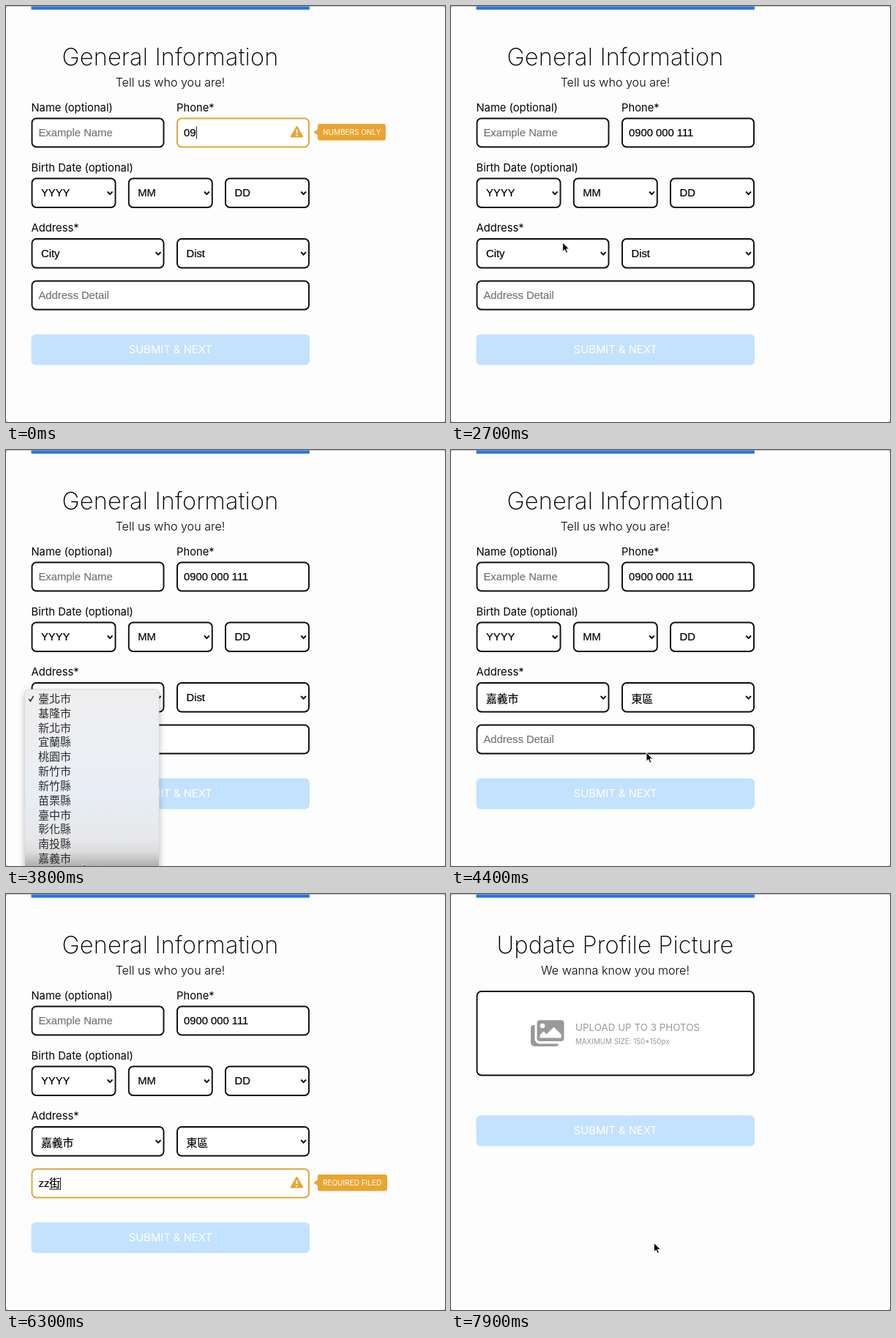
An HTML page for the animation above (8000 ms loop, 600x568 px).

```html
<!DOCTYPE html>
<html lang="en">
<head>
<meta charset="utf-8">
<title>Form walkthrough</title>
<style>
html, body { margin: 0; width: 100%; height: 100%; overflow: hidden; background: #fdfdfd; }
svg { display: block; width: 600px; height: 568px; }
text { white-space: pre; }
.ui { font-family: Inter, sans-serif; }
.field { font-family: "Liberation Sans", "Noto Sans CJK TC", "Noto Sans CJK", sans-serif; font-size: 14.8px; stroke: #000; stroke-width: .2px; }
.menu { font-family: "Noto Sans CJK TC", "Noto Sans CJK", sans-serif; font-size: 15px; }
.mid { text-anchor: middle; }
.title { font-size: 32.5px; font-weight: 200; letter-spacing: .15px; }
.sub { font-size: 16.1px; font-weight: 300; }
.label { font-size: 14.75px; font-weight: 430; }
.btn { font-size: 14.8px; }
.tip { font-size: 10px; fill: #fff; }
.hint { fill: #757575; stroke: #757575; }
</style>
</head>
<body>
<svg id="stage" viewBox="0 0 600 568"></svg>
<script>
const GOLD = '#eaa430', EDGE = '#dba637', INK = '#0c0c0c', PALE = [195, 226, 255], BLUE = [47, 118, 217];
const CITIES = '臺北市 基隆市 新北市 宜蘭縣 桃園市 新竹市 新竹縣 苗栗縣 臺中市 彰化縣 南投縣 嘉義市'.split(' ');
const ROW = 19.83, MENU_TOP = 330;
const DIGITS = '0900000111';
// Address text while typing: [time, committed, composing]
const ADDRESS = [[5200, 'z', ''], [5400, 'zz', ''], [5600, 'zz', 'ㄐ'], [5800, 'zz', 'ㄐㄧ'],
  [5900, 'zz', 'ㄐㄧㄝ'], [6100, 'zz', '街'], [6500, 'zz街', '']];
// Pointer: [time, x, y, shape], eased from one entry to the next
const POINTER = [[0, 300, 180, ''], [1900, 300, 180, 'beam'], [2000, 288, 194, 'arrow'], [2400, 152.7, 323, 'arrow'],
  [3000, 152.7, 323, 'arrow'], [3650, 106, 565, 'arrow'], [3900, 106, 565, 'arrow'], [4350, 267, 413, 'arrow'],
  [4420, 267, 413, 'arrow'], [4500, 284, 404, 'beam'], [4600, 294, 401, 'beam'], [5200, 294, 401, ''],
  [7000, 294, 401, 'beam'], [7100, 291, 420, 'arrow'], [7250, 282, 455, 'hand'], [7400, 277.5, 476.4, 'hand'],
  [7900, 277.5, 476.4, 'arrow'], [8000, 277.5, 476.4, 'arrow']];

const text = (x, y, cls, s, extra = '') =>
  `<text x="${x}" y="${y}" class="${cls}" ${extra}>${s.replace('&', '&amp;')}</text>`;
const box = (x, y, w, h, extra = '') =>
  `<rect x="${x + 1}" y="${y + 1}" width="${w - 2}" height="${h - 2}" rx="6" fill="#fff" stroke="${INK}" stroke-width="1.9" ${extra}/>`;
const select = (x, y, w, s, id) => box(x, y, w, 41.5) + text(x + 13.5, y + 25.5, 'field', s, `id="${id}"`) +
  `<path d="M${x + w - 11.8} ${y + 19}l3.4 3.6l3.4 -3.6" fill="none" stroke="${INK}" stroke-width="1.9"/>`;
const button = (y, id) => `<rect x="34.5" y="${y}" width="380.5" height="42" rx="6" fill="rgb(${PALE})" id="${id}"/>` +
  text(224.8, y + 25.7, 'ui mid btn', 'SUBMIT & NEXT', 'fill="#fff"');
const warning = (y, w, s, id) => `<g id="${id}">
  <path d="M397.5 ${y - 7}l7.4 13h-14.8z" fill="${GOLD}" stroke="${GOLD}" stroke-width="2.6" stroke-linejoin="round"/>
  <path d="M397.5 ${y - 3.4}v5" stroke="#fff" stroke-width="2"/><circle cx="397.5" cy="${y + 4.3}" r="1.2" fill="#fff"/>
  <path d="M420 ${y}l7 -4.5v9z" fill="${GOLD}"/>
  <rect x="426" y="${y - 11.2}" width="${w}" height="22.4" rx="3" fill="${GOLD}"/>
  ${text(433, y + 3.6, 'ui tip', s)}</g>`;
const caret = (y, id) => `<rect y="${y}" width="1" height="17" fill="#111" id="${id}"/>`;

const formPage = `<g id="form">
  ${text(224.5, 81, 'ui mid title', 'General Information')}
  ${text(224.5, 110, 'ui mid sub', 'Tell us who you are!')}
  ${text(34.5, 144, 'ui label', 'Name (optional)')}${text(233, 144, 'ui label', 'Phone*')}
  ${text(34.5, 225.5, 'ui label', 'Birth Date (optional)')}${text(34.5, 308, 'ui label', 'Address*')}
  ${box(34.5, 152.5, 182, 41)}${text(44.5, 178, 'field hint', 'Example Name')}
  ${box(233, 152.5, 182, 41, 'id="phoneBox"')}${text(243, 178, 'field', '', 'id="phone"')}
  ${caret(164.5, 'phoneCaret')}${warning(172.3, 93, 'NUMBERS ONLY', 'phoneWarn')}
  ${select(34.5, 234.5, 116, 'YYYY', 'year')}${select(166.8, 234.5, 116, 'MM', 'month')}${select(299, 234.5, 116, 'DD', 'day')}
  ${select(34.5, 317, 182, 'City', 'city')}${select(233, 317, 182, 'Dist', 'dist')}
  ${box(34.5, 374.5, 380.5, 41, 'id="addrBox"')}${text(44.5, 400, 'field', '', 'id="addr"')}
  <rect y="402.6" height="1" fill="${INK}" id="underline"/>
  ${caret(387, 'addrCaret')}${warning(394.3, 95, 'REQUIRED FILED', 'addrWarn')}
  ${button(448.3, 'submit')}
  <g id="menu">
    <rect x="26" y="327" width="183" height="260" rx="6" fill="url(#glass)" stroke="#c9c9c9" stroke-width=".8" filter="url(#shadow)"/>
    <rect x="26.4" y="327.4" width="182.2" height="259" rx="6" fill="url(#glass)"/>
    <rect x="30" width="175" height="${ROW}" rx="4" fill="#3b82f0" id="mark"/>
    <path d="M31.2 340l2.3 3l4 -7.2" fill="none" stroke="#222" stroke-width="1.5" id="check"/>
    ${CITIES.map((c, i) => text(44, (344.9 + i * ROW).toFixed(1), 'menu city', c)).join('')}
  </g></g>`;

const uploadPage = `<g id="upload">
  ${text(224.5, 81, 'ui mid title', 'Update Profile Picture')}
  ${text(224.5, 110, 'ui mid sub', 'We wanna know you more!')}
  ${box(34.5, 132, 380.5, 116.5)}
  <g fill="#999">
    <path d="M109 183a4 4 0 0 1 4 -4h1.5v19a6.5 6.5 0 0 0 6.5 6.5h26a4 4 0 0 1 -4 3.5h-29a5 5 0 0 1 -5 -5z"/>
    <rect x="117.5" y="172.3" width="37" height="28.7" rx="4"/>
    <circle cx="125" cy="180" r="3.3" fill="#fff"/>
    <path d="M121.5 196.5v-4l5 -5l4 4l10 -10l10 10v5z" fill="#fff"/>
  </g>
  ${text(170, 187, 'ui', 'UPLOAD UP TO 3 PHOTOS', 'font-size="13.4" fill="#999"')}
  ${text(170, 205, 'ui', 'MAXIMUM SIZE: 150*150px', 'font-size="9.8" fill="#999"')}
  ${button(302.3, 'submit2')}</g>`;

document.getElementById('stage').innerHTML = `
  <defs>
    <linearGradient id="glass" gradientUnits="userSpaceOnUse" x1="0" y1="327" x2="0" y2="568">
      <stop offset="0" stop-color="#eeeeee"/><stop offset=".35" stop-color="#eceef2"/>
      <stop offset=".6" stop-color="#e8eef6"/><stop offset=".85" stop-color="#e6e7e9"/>
      <stop offset=".92" stop-color="#dcdcdc"/><stop offset="1" stop-color="#b0b0b0"/>
    </linearGradient>
    <filter id="shadow" x="-20%" y="-20%" width="140%" height="140%">
      <feDropShadow dx="0" dy="3" stdDeviation="4" flood-opacity=".28"/>
    </filter>
  </defs>
  <rect width="600" height="568" fill="#c4c4c4"/>
  <rect y="1" width="600" height="567" rx="3" fill="#fdfdfd"/>
  <rect x="34.5" y="0.5" width="380.3" height="4.5" fill="rgb(${BLUE})"/>
  ${formPage}${uploadPage}
  <g id="pointer">
    <path id="arrow" d="M0 0V12.2L2.8 9.6L4.8 14.2L6.9 13.3L4.9 8.8H8.7Z" fill="#000" stroke="#fff" stroke-width=".9"/>
    <path id="beam" d="M-3 -8q3 0 3 2.5q0 -2.5 3 -2.5M0 -5.5V5.5M-3 8q3 0 3 -2.5q0 2.5 3 2.5M-1.5 1h3" fill="none" stroke="#222" stroke-width="1.1"/>
    <path id="hand" d="M2.6 8V1.6a1.2 1.2 0 0 1 2.4 0V5.4q2 -.8 2.3 .6q1.8 -.6 2.1 .7q2 -.4 2 1.4v2.4q0 1.6 -1.2 3.2H4.4Q3.6 11.8 .3 8.6q-.8 -1.6 .8 -1.6z M6 9.3v2.4M8.3 9.3v2.4" fill="#fff" stroke="#111" stroke-width="1"/>
  </g>`;

const $ = Object.fromEntries([...document.querySelectorAll('[id]')].map(e => [e.id, e]));
const cityRows = [...document.querySelectorAll('.city')];
const show = (el, on) => el.setAttribute('display', on ? 'inline' : 'none');
const set = (el, name, v) => el.setAttribute(name, v);
const ramp = (t, a, b) => Math.min(1, Math.max(0, (t - a) / (b - a)));
const put = (el, s) => { if (el.textContent !== s) el.textContent = s; };
const pen = document.createElement('canvas').getContext('2d');
const width = s => { pen.font = '14.8px "Liberation Sans", "Noto Sans CJK TC", sans-serif'; return pen.measureText(s).width; };
const blink = (t, start) => (t - start) % 1000 < 500;

function pointerAt(t) {
  let i = POINTER.length - 2;
  while (POINTER[i][0] > t) i--;
  const [t0, x0, y0, shape] = POINTER[i], [t1, x1, y1] = POINTER[i + 1];
  const k = ramp(t, t0, t1), e = k * k * (3 - 2 * k);
  return { x: x0 + (x1 - x0) * e, y: y0 + (y1 - y0) * e, shape };
}

function drawPhone(t) {
  const n = Math.min(10, 2 + Math.floor(t / 200));
  const s = [DIGITS.slice(0, Math.min(n, 4)), DIGITS.slice(4, Math.min(n, 7)), DIGITS.slice(7, n)].filter(Boolean).join(' ');
  const bad = t < 1700;
  put($.phone, s);
  set($.phoneCaret, 'x', 243.4 + width(s));
  show($.phoneCaret, t < 1700 || t < 2400 && blink(t, 1600));
  show($.phoneWarn, bad);
  set($.phoneBox, 'stroke', bad ? EDGE : INK);
}

function drawAddress(t) {
  const focus = t >= 5000;
  const [, done, raw] = ADDRESS.filter(a => a[0] <= t).pop() || [0, '', ''];
  const bad = t >= 5200 && t < 6600, x = 44.3 + width(done), w = width(raw);
  put($.addr, focus ? done + raw : 'Address Detail');
  set($.addr, 'class', focus ? 'field' : 'field hint');
  set($.underline, 'x', x);
  set($.underline, 'width', w);
  set($.addrCaret, 'x', x + w);
  show($.addrCaret, focus && (t < 6700 || t < 7200 && blink(t, 6500)));
  show($.addrWarn, bad);
  set($.addrBox, 'stroke', bad ? EDGE : INK);
}

function drawMenu(t, p) {
  const picked = t >= 3900;
  put($.city, picked ? '嘉義市' : 'City');
  put($.dist, picked ? '東區' : 'Dist');
  set($.city, 'y', picked ? 345 : 342.5);
  set($.dist, 'y', picked ? 345 : 342.5);
  show($.menu, t >= 2800 && t < 4050);
  set($.menu, 'opacity', 1 - ramp(t, 3900, 4050));
  const hot = t < 3750 ? Math.max(0, Math.min(11, Math.floor((p.y - MENU_TOP) / ROW))) : -1;
  show($.mark, hot >= 0);
  set($.mark, 'y', MENU_TOP + hot * ROW);
  set($.check, 'stroke', hot === 0 ? '#fff' : '#222');
  cityRows.forEach((r, i) => set(r, 'fill', i === hot ? '#fff' : '#2c2c2c'));
}

function render(t) {
  const p = pointerAt(t), k = ramp(t, 6600, 6800);
  drawPhone(t);
  drawAddress(t);
  drawMenu(t, p);
  set($.submit, 'fill', `rgb(${PALE.map((c, i) => Math.round(c + (BLUE[i] - c) * k))})`);
  show($.form, t < 7600);
  show($.upload, t >= 7600);
  set($.pointer, 'transform', `translate(${p.x.toFixed(2)} ${p.y.toFixed(2)})`);
  for (const s of ['arrow', 'beam', 'hand']) show($[s], p.shape === s);
}

const start = performance.now();
function tick() {
  render((performance.now() - start) % 8000);
  requestAnimationFrame(tick);
}
tick();
</script>
</body>
</html>
```
